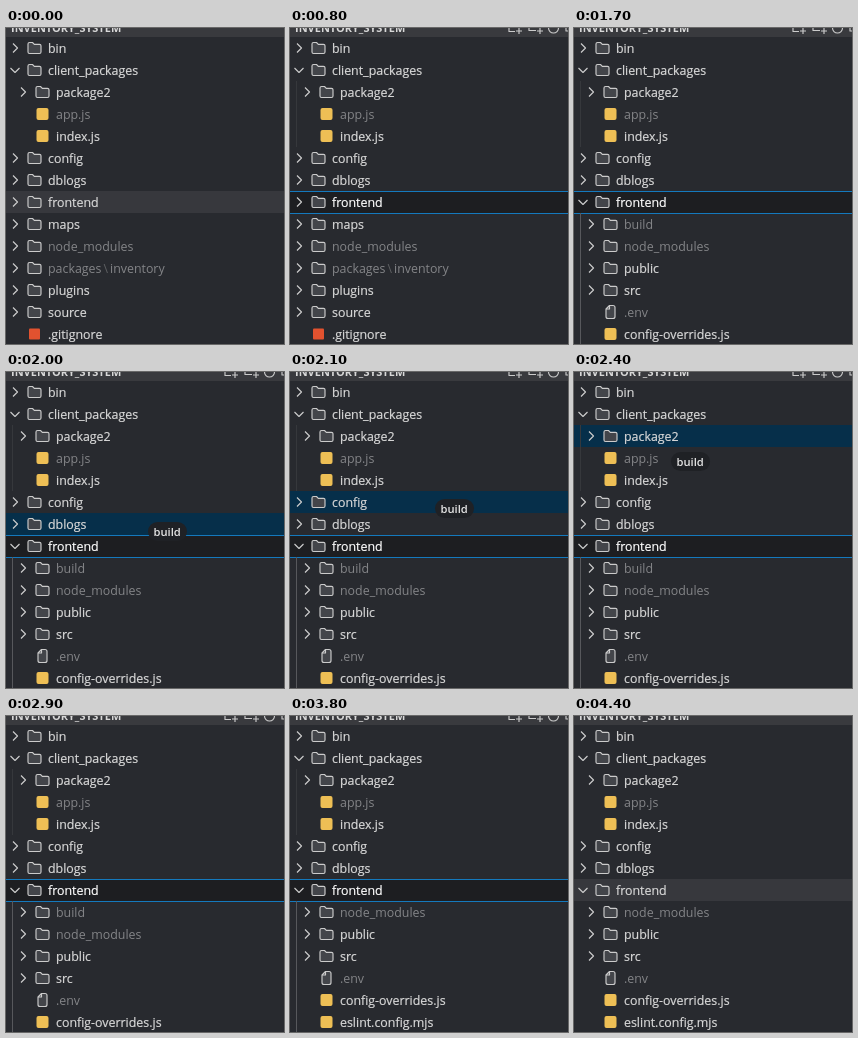
Recreate the animation shown at these times as an HTML page. Size 278 by 316 pixels, loop 4.6 s.

```html
<!DOCTYPE html>
<html lang="en">
<head>
<meta charset="utf-8">
<title>File tree drag and drop</title>
<style>
html, body { margin: 0; width: 100%; height: 100%; overflow: hidden; background: #282a2f; }
svg { display: block; width: 278px; height: 316px; }
text { font-family: "Open Sans", "Noto Sans", sans-serif; font-size: 12.4px; fill: #d8d8d8; stroke: #d8d8d8; stroke-width: .2px; white-space: pre; }
.dim { fill: #848588; stroke: none; }
.sep { fill: #5f6063; }
.active { fill: #fff; stroke: #fff; }
.line { fill: none; stroke: #cbcbcb; stroke-width: 1.15; stroke-linejoin: round; }
.body { fill: #43454a; }
.title { font-size: 11px; font-weight: 700; stroke: none; }
.badge { font-size: 11.2px; font-weight: 600; fill: #e6e6e6; stroke: none; }
</style>
</head>
<body>
<svg id="stage" viewBox="0 0 278 316"></svg>
<script>
const LOOP = 4600, ROW = 22, TOP = 9;
const stage = document.getElementById('stage');

const row = (name, kind = 'folder', depth = 0, dim = false) => ({ name, kind, depth, dim });

const head = [
  row('bin'),
  row('client_packages', 'open'),
  row('package2', 'folder', 1),
  row('app.js', 'js', 1, true),
  row('index.js', 'js', 1),
  row('config'),
  row('dblogs')
];
const tail = [
  row('maps'),
  row('node_modules', 'folder', 0, true),
  row('packages\\inventory', 'folder', 0, true),
  row('plugins'),
  row('source'),
  row('.gitignore', 'git')
];
const build = row('build', 'folder', 1, true);
const children = [
  row('node_modules', 'folder', 1, true),
  row('public', 'folder', 1),
  row('src', 'folder', 1),
  row('.env', 'file', 1, true),
  row('config-overrides.js', 'js', 1),
  row('eslint.config.mjs', 'js', 1)
];
const FRONTEND = head.length;

// Dragged label: time, left, top
const path = [
  [1800, 112, 195], [1900, 130, 174], [2000, 142, 150], [2100, 145, 127],
  [2200, 130, 111], [2300, 108, 91], [2400, 97, 80], [2700, 92, 78]
];
// Drop highlight: start, first row, row count
const drops = [[2000, 6, 1], [2100, 5, 1], [2200, 1, 4], [2300, 2, 1]];
const DROP_END = 2900;

const line = (d, extra = '') => `<path class="line ${extra}" d="${d}"/>`;
const rect = (x, y, w, h, fill, r = 0) =>
  `<rect x="${x}" y="${y}" width="${w}" height="${h}" rx="${r}" fill="${fill}"/>`;
const text = (x, y, s, cls = '') => `<text x="${x}" y="${y}" class="${cls}">${s}</text>`;
const rowY = i => TOP + i * ROW;

const folder = line('M-6.5-4q0-1.5 1.5-1.5h3l1.8 1.8h5.2q1.5 0 1.5 1.5v6.2q0 1.5-1.5 1.5h-10q-1.5 0-1.5-1.5z', 'body');
const icons = {
  folder,
  open: folder,
  js: rect(-6, -6, 12, 12, '#eebf55', 2),
  git: rect(-5.5, -5.5, 11, 11, '#e2522f', 1),
  file: line('M-1-6.5h3.5q2 0 2 2v9q0 2-2 2h-5q-2 0-2-2v-7.5z', 'body') + line('M-1-6.5v3.5h-3.5')
};

function drawRow(r, i, active) {
  const shift = r.depth * 8, mid = rowY(i) + 11;
  let chevron = '';
  if (r.kind === 'open') chevron = line(`M${4.5 + shift} ${mid - 2}l4.5 4.5l4.5-4.5`, active ? 'active-line' : '');
  if (r.kind === 'folder') chevron = line(`M${7 + shift} ${mid - 4.5}l4.5 4.5l-4.5 4.5`);
  const label = r.name.replace(/\\(.*)/, '<tspan class="sep" dx="2">\\</tspan><tspan dx="2">$1</tspan>');
  return chevron +
    `<g transform="translate(${28.5 + shift} ${mid})">${icons[r.kind]}</g>` +
    text(42 + shift, mid + 4.5, label, active ? 'active' : r.dim ? 'dim' : '');
}

function header(hovered) {
  let s = rect(0, 0, 278, TOP, '#393a3e') + text(5, 3.5, 'INVENTORY_SYSTEM', 'title');
  if (hovered) {
    s += line('M219-6v9.5h6M229 0v6M226 3h6') +
      line('M239-6v8.5h7M250 0v6M247 3h6') +
      line('M258.5 0a5 5 0 0 0 10 0') +
      line('M276-6v9h4');
  }
  return s;
}

const guide = (first, count, color) => rect(6, rowY(first), 1, count * ROW, color);

function dragLabel(t) {
  let i = 0;
  while (i < path.length - 1 && path[i + 1][0] <= t) i++;
  const a = path[i], b = path[i + 1] || a;
  const k = b === a ? 0 : (t - a[0]) / (b[0] - a[0]);
  const x = a[1] + (b[1] - a[1]) * k, y = a[2] + (b[2] - a[2]) * k;
  return rect(x, y, 39, 19, '#1f2125', 9.5) + text(x + 5.5, y + 13.5, 'build', 'badge');
}

function draw(t) {
  const open = t >= 900, focused = t >= 800 && t < 4400, hovered = t >= 200 && t < 4300;
  const dragging = t >= path[0][0] && t < DROP_END;
  const below = !open ? tail : t < 3000 ? [build, ...children] : children;
  const rows = [...head, row('frontend', open ? 'open' : 'folder'), ...below];
  const y = rowY(FRONTEND);

  let s = rect(0, 0, 278, 316, '#282a2f') + header(hovered);
  s += rect(0, y, 278, ROW, focused ? '#1d1e21' : '#37383d');
  if (focused) s += rect(0, y, 278, 1, '#1479bd') + rect(0, y + ROW, 278, 1, '#1479bd');
  if (dragging) {
    const drop = drops.filter(d => d[0] <= t).pop();
    if (drop) s += rect(0, rowY(drop[1]), 278, drop[2] * ROW, '#062f4a');
  }
  if (hovered) s += guide(2, 3, '#36383c');
  if (open && focused) s += guide(FRONTEND + 1, below.length, '#57585c');
  s += rows.map((r, i) => drawRow(r, i, focused && i === FRONTEND)).join('');
  if (dragging) s += dragLabel(t);
  stage.innerHTML = s;
}

let last = -1;
function tick() {
  const t = Math.floor(performance.now() % LOOP / 100) * 100;
  if (t !== last) draw(last = t);
  requestAnimationFrame(tick);
}
tick();
</script>
</body>
</html>
```
